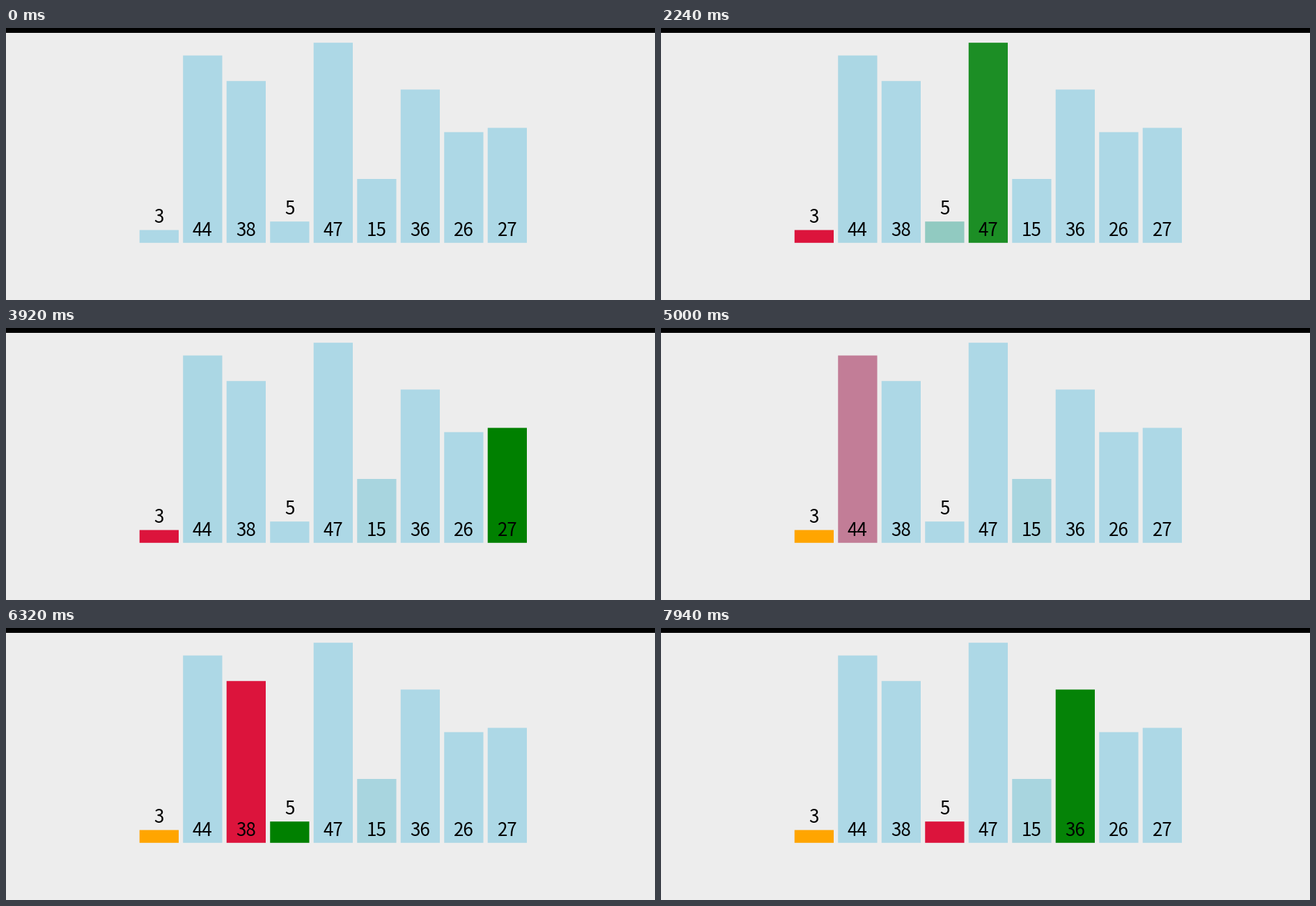
These frames come from a looping animation (932x391 px, 8 s). A matplotlib script:

```python
import matplotlib.pyplot as plt
import numpy as np
from matplotlib.animation import FuncAnimation
from matplotlib.colors import to_rgb
from matplotlib.patches import Rectangle

W, H, DPI = 932, 391, 100
LOOP_MS, INTERVAL = 8000, 20
TICK_MS, FADE_PER_TICK = 60, 0.3

VALUES = [3, 44, 38, 5, 47, 15, 36, 26, 27]
LEFT, PITCH, BAR_W = 191.75, 62.5, 56.25
BASE, UNIT = 308.8, 6.12

IDLE, SCAN, BEST, FORMER = map(
    lambda name: np.array(to_rgb(name)), ("lightblue", "green", "crimson", "orange"))


def advance(i):
    """Move the scanning highlight from bar i to the next one."""
    return {i: IDLE, i + 1: SCAN}


# start in ms, number of fade steps, fade amount at the first step, new colours
EVENTS = [
    (500, 3, 0.40, {0: BEST}),
    (920, 3, 0.40, {1: SCAN}),
    (1280, 4, 0.09, advance(1)),
    (1700, 4, 0.17, advance(2)),
    (2120, 4, 0.24, advance(3)),
    (2540, 4, 0.31, advance(4)),
    (2960, 3, 0.37, advance(5)),
    (3320, 4, 0.17, advance(6)),
    (3740, 4, 0.24, advance(7)),
    (4220, 3, 0.40, {8: IDLE}),
    (4580, 3, 0.40, {0: FORMER}),
    (5000, 3, 0.46, {1: BEST}),
    (5420, 3, 0.50, {2: SCAN}),
    (5840, 3, 0.40, {1: IDLE, 2: BEST}),
    (6200, 3, 0.46, {3: SCAN}),
    (6620, 3, 0.46, {2: IDLE, 3: BEST}),
    (7040, 3, 0.46, {4: SCAN}),
    (7460, 3, 0.40, advance(4)),
    (7820, 3, 0.37, advance(5)),
]


def colours_at(ms):
    colours = [IDLE] * len(VALUES)
    for start, steps, first, targets in EVENTS:
        if ms < start:
            break
        step = min((ms - start) // TICK_MS, steps - 1)
        amount = min(1, first + FADE_PER_TICK * step)
        for i, target in targets.items():
            colours[i] = colours[i] + (target - colours[i]) * amount
    return colours


fig = plt.figure(figsize=(W / DPI, H / DPI), dpi=DPI, facecolor="#ededed")
ax = fig.add_axes([0, 0, 1, 1])
ax.set(xlim=(0, W), ylim=(H, 0))
ax.axis("off")
ax.add_patch(Rectangle((0, 0), W, 7, color="black", lw=0))

bars = []
for i, value in enumerate(VALUES):
    x, height = LEFT + i * PITCH, value * UNIT
    bar = Rectangle((x, BASE - height), BAR_W, height, fc=IDLE, lw=0, snap=False)
    bars.append(ax.add_patch(bar))
    # Short bars carry their label on top
    baseline = 299 if value > 10 else BASE - height - 10.2
    ax.text(x + BAR_W / 2, baseline, str(value), ha="center", va="baseline",
            family="Noto Sans CJK JP", size=26 * 72 / DPI, color="black")


def update(frame):
    for bar, colour in zip(bars, colours_at(frame * INTERVAL)):
        bar.set_facecolor(np.clip(colour, 0, 1))
    return bars


anim = FuncAnimation(fig, update, frames=LOOP_MS // INTERVAL, interval=INTERVAL,
                     repeat=True, repeat_delay=0)
plt.show()
```
